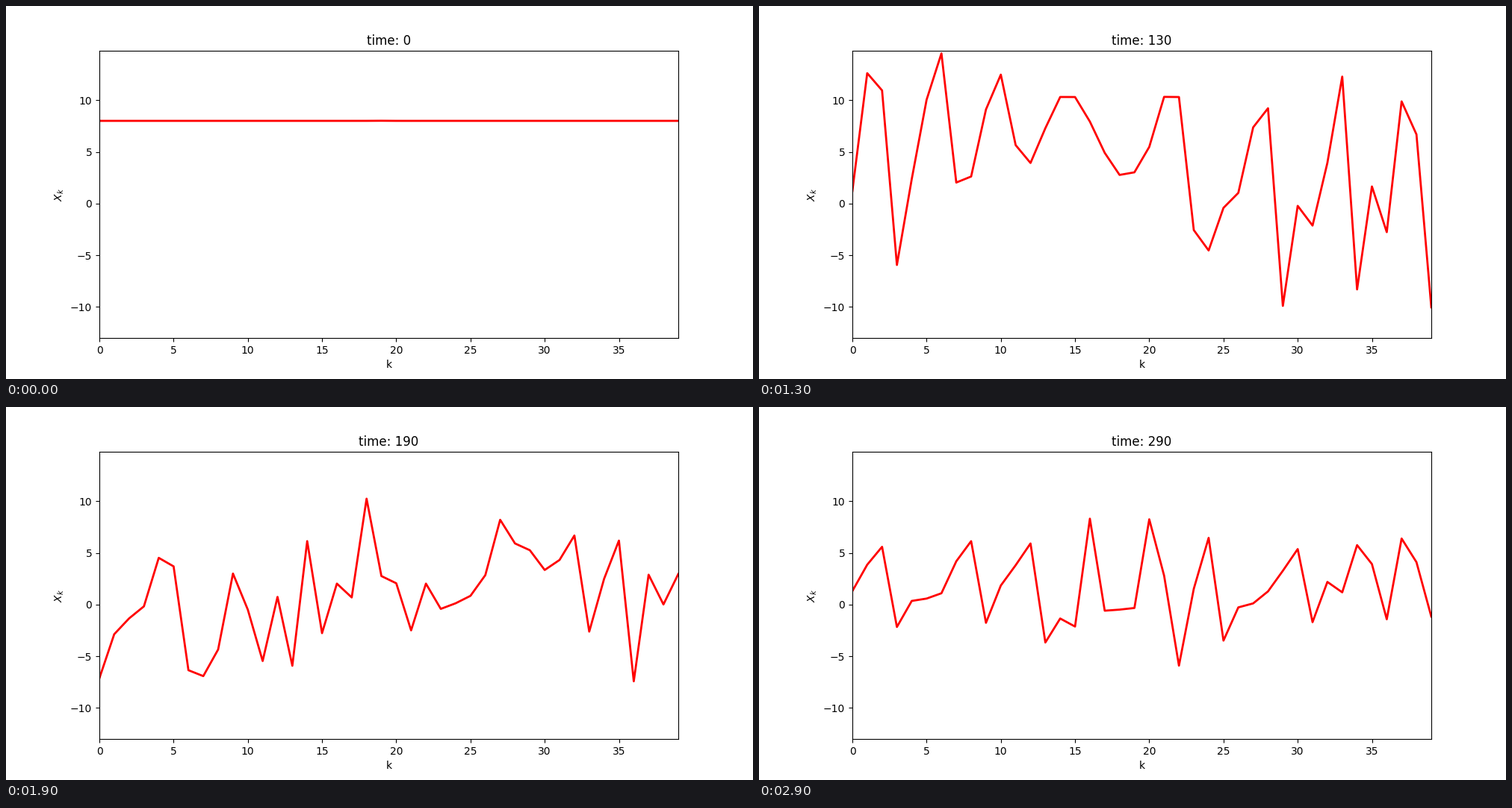
Recreate the animation shown at these times as a matplotlib script. Size 1000 by 500 pixels, loop 3000 ms.

```python
import numpy as np
import matplotlib.pyplot as plt
from matplotlib.animation import FuncAnimation

SITES = 40
FORCING = 8.0
DT = 0.01
FRAMES = 30
STEPS_PER_FRAME = 10


def tendency(x):
    """Lorenz-96 equations on a periodic ring."""
    return (np.roll(x, -1) - np.roll(x, 2)) * np.roll(x, 1) - x + FORCING


def rk4_step(x):
    k1 = tendency(x)
    k2 = tendency(x + DT / 2 * k1)
    k3 = tendency(x + DT / 2 * k2)
    k4 = tendency(x + DT * k3)
    return x + DT / 6 * (k1 + 2 * k2 + 2 * k3 + k4)


def integrate(steps):
    x = np.full(SITES, FORCING)
    x[19] += 0.01  # small kick to the steady state
    states = []
    for _ in range(steps):
        x = rk4_step(x)
        states.append(x)
    return np.array(states)


states = integrate(FRAMES * STEPS_PER_FRAME)

fig, ax = plt.subplots(figsize=(10, 5), dpi=100)
line, = ax.plot(np.arange(SITES), states[0], color="red", lw=2)
ax.set_xlim(0, SITES - 1)
ax.set_ylim(-13.0, 14.78)
ax.set_xlabel("k")
ax.set_ylabel("$X_k$")
title = ax.set_title("time: 0")


def update(frame):
    step = frame * STEPS_PER_FRAME
    line.set_ydata(states[step])
    title.set_text(f"time: {step}")
    return line, title


anim = FuncAnimation(fig, update, frames=FRAMES, interval=100, repeat=True)
plt.show()
```
